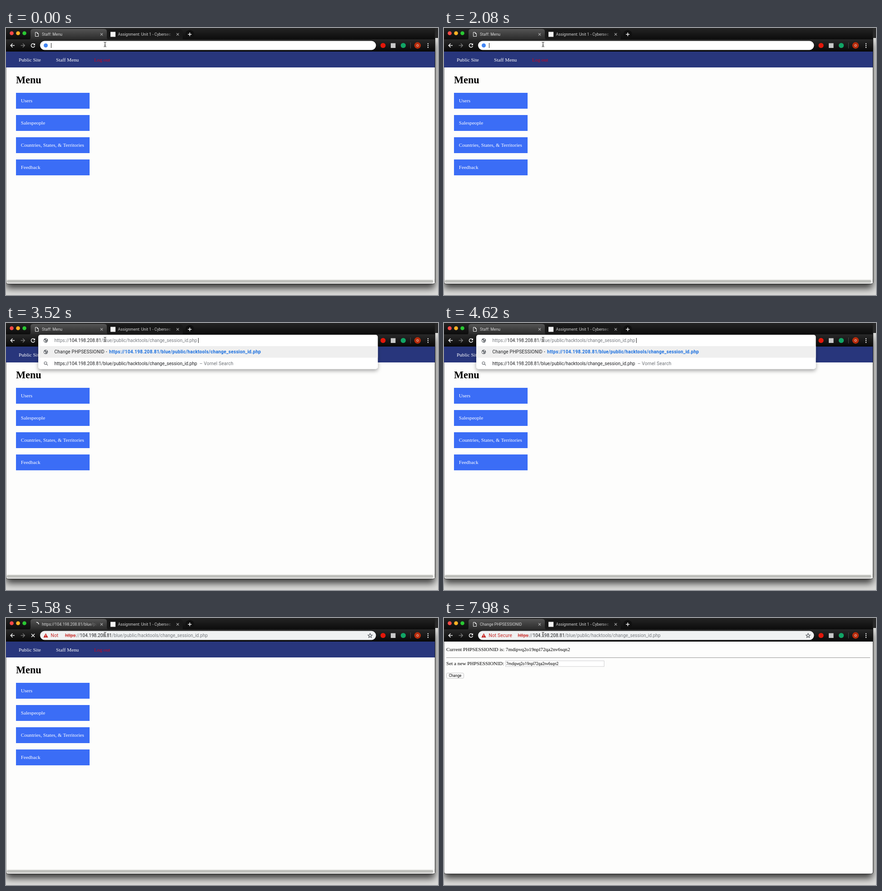
An HTML page for the animation above (8 s loop, 951x589 px).

```html
<!DOCTYPE html>
<html lang="en">
<head>
<meta charset="utf-8">
<title>Browser session</title>
<style>
  html, body { margin: 0; width: 100%; height: 100%; overflow: hidden; background: #dcdcda; }
  #shadow { position: absolute; left: 0; top: 23px; width: 944px; height: 541px; border-radius: 5px; box-shadow: 0 10px 16px rgba(0,0,0,.75); }
  svg { position: absolute; left: 0; top: 0; display: block; }
  text { font-family: Roboto, sans-serif; font-size: 10.1px; }
  .page text { font-family: "Liberation Serif", serif; font-size: 11.2px; }
  .page text.h1 { font-size: 22.3px; font-weight: bold; }
  .page text.field { font-family: Roboto, sans-serif; font-size: 8.2px; }
  .tab { font-size: 8.75px; fill: #d6d6d6; }
  .row { letter-spacing: .2px; }
  .line { fill: none; stroke: #f4f4f4; stroke-width: 1.5; }
  .thin { stroke: #b0b0b0; stroke-width: 1.1; }
</style>
</head>
<body>
<div id="shadow"></div>
<svg width="951" height="589" viewBox="0 0 951 589">
  <defs>
    <linearGradient id="strip" x2="0" y2="1"><stop stop-color="#242424"/><stop offset="1" stop-color="#0b0b0b"/></linearGradient>
    <linearGradient id="active" x2="0" y2="1"><stop stop-color="#555"/><stop offset="1" stop-color="#292929"/></linearGradient>
    <linearGradient id="bar" x2="0" y2="1"><stop stop-color="#292929"/><stop offset="1" stop-color="#080808"/></linearGradient>
    <linearGradient id="fade1" gradientUnits="userSpaceOnUse" x1="182" x2="201"><stop stop-color="#d6d6d6"/><stop offset="1" stop-color="#d6d6d6" stop-opacity="0"/></linearGradient>
    <linearGradient id="fade2" gradientUnits="userSpaceOnUse" x1="348" x2="369"><stop stop-color="#d0d0d0"/><stop offset="1" stop-color="#d0d0d0" stop-opacity="0"/></linearGradient>
    <filter id="drop" x="-5%" y="-20%" width="110%" height="160%"><feDropShadow dx="0" dy="4" stdDeviation="4" flood-opacity=".35"/></filter>
    <clipPath id="chipClip"><rect id="chipBox" x="96" y="28" width="0" height="21"/></clipPath>
    <g id="globe">
      <circle r="4.8" fill="#5f6368"/>
      <path d="M-3.8-1.5 -1-.2 -.4 2 -1 3.8 -3.4 1.6zM0-3.8 2.6-3 2.2-.8 0-1.6zM1.4 1 3.6.8 2 3.2z" fill="#fff"/>
    </g>
    <path id="cross" d="M-2.6-2.6 2.6 2.6M2.6-2.6-2.6 2.6"/>
  </defs>

  <rect x="944" width="7" height="22" fill="#292929"/>
  <path d="M0 0H944.5V560q0 4.5-5 4.5H5q-5 0-5-4.5z" fill="#fdfdfc" stroke="#262626"/>

  <g class="page" id="menuPage">
    <rect y="52" width="944" height="35" fill="#28367c"/>
    <g fill="#fff"><text x="28" y="74">Public Site</text><text x="110" y="74">Staff Menu</text></g>
    <text x="194" y="74" fill="#d0001c">Log out</text>
    <text class="h1" x="22" y="122">Menu</text>
    <g id="items"></g>
    <rect x="1" y="554" width="943" height="9" fill="#f2f2f0"/>
    <rect x="1.5" y="556" width="939" height="6" rx="3" fill="#bfc0bc"/>
  </g>

  <g class="page" id="sessionPage">
    <text x="5" y="73">Current PHPSESSIONID is: 7mdipvq2o19npl72qa2nv6sqn2</text>
    <path d="M5 87.5H938" stroke="#949494"/>
    <text x="5" y="104">Set a new PHPSESSIONID:</text>
    <rect x="135.5" y="94.5" width="217" height="12.5" fill="#fff" stroke="#cfcfd2"/>
    <text class="field" x="137" y="104">7mdipvq2o19npl72qa2nv6sqn2</text>
    <rect x="5.5" y="121.5" width="38" height="11.5" rx="2.5" fill="#fff" stroke="#c4c4c4"/>
    <text class="field" x="10.7" y="130">Change</text>
  </g>

  <rect width="944" height="26" fill="url(#strip)"/>
  <path d="M222 25V9q0-6 6-6H383q6 0 6 6V25z" fill="#191919"/>
  <path d="M49 26q5 0 5-6V8q0-6 6-6H216q6 0 6 6V20q0 6 5 6z" fill="url(#active)"/>
  <rect y="25" width="944" height="27" fill="url(#bar)"/>
  <circle cx="12.5" cy="11.5" r="4.3" fill="#fb4948"/>
  <circle cx="26.5" cy="11.5" r="4.3" fill="#fdb225"/>
  <circle cx="40.5" cy="11.5" r="4.3" fill="#2ac833"/>
  <path id="doc" class="line" style="stroke-width:1" d="M64.5 9.5H68.5L71.5 12.5V18.5H64.5zM68.5 9.5V12.5H71.5"/>
  <path id="spinner" class="line"/>
  <text id="title" class="tab" x="79" y="17" fill="url(#fade1)" style="fill:url(#fade1)"></text>
  <use href="#cross" class="thin" x="210.5" y="14"/>
  <rect x="230" y="8.5" width="11" height="11" fill="#f5f5f5"/>
  <text class="tab" x="246.5" y="17" style="fill:url(#fade2)">Assignment: Unit 1 - Cybersec</text>
  <use href="#cross" class="thin" x="378" y="14"/>
  <circle cx="404.5" cy="14" r="9.5" fill="#101010"/>
  <path class="line" d="M400.5 14H408.5M404.5 10V18"/>

  <path class="line" d="M19 38.5H10.5M14.5 34.3 10.3 38.5 14.5 42.7"/>
  <path class="line" style="stroke:#777" d="M32.5 38.5H41M37 34.3 41.2 38.5 37 42.7"/>
  <g id="reload"><path class="line" d="M62.4 35.6A4.1 4.1 0 1 0 63.4 39.8"/><path d="M64 33.8V38H59.8z" fill="#f4f4f4"/></g>
  <path id="stop" class="line" d="M56 35 63 42M63 35 56 42"/>
  <rect id="pill" x="75" y="28.5" width="739.5" height="20" rx="10"/>
  <circle cx="830" cy="38.5" r="5.6" fill="#e3170b"/>
  <rect x="847" y="33.5" width="10.5" height="10.5" fill="#c9c9c9"/>
  <circle cx="874.5" cy="38.5" r="5.6" fill="#11a566"/>
  <path d="M890.5 32V45" stroke="#4a4a4a"/>
  <circle cx="906" cy="38.5" r="7.2" fill="#b72b0b"/>
  <text x="906" y="41.4" text-anchor="middle" fill="#fff" style="font-size:8px">O</text>
  <g fill="#f4f4f4"><circle cx="929" cy="34.7" r="1.2"/><circle cx="929" cy="38.7" r="1.2"/><circle cx="929" cy="42.7" r="1.2"/></g>

  <g id="popup">
    <rect x="71" y="26" width="747.5" height="75.5" rx="5" fill="#fff" filter="url(#drop)"/>
    <rect x="71" y="51" width="747.5" height="25.5" fill="#efefef"/>
    <use href="#globe" x="87.5" y="63.8"/>
    <g class="row">
      <text x="106.5" y="67.3" fill="#202124">Change PHPSESSIONID -</text>
      <text x="227" y="67.3" fill="#1a6fdf" font-weight="700" style="letter-spacing:.26px">https://104.198.208.81/blue/public/hacktools/change_session_id.php</text>
    </g>
    <path d="M89.5 91 92 93.5" stroke="#6b6f74" stroke-width="1.3"/>
    <circle cx="87" cy="88.4" r="2.9" fill="none" stroke="#6b6f74" stroke-width="1.2"/>
    <text x="106.5" y="92.5" fill="#202124">https://104.198.208.81/blue/public/hacktools/change_session_id.php</text>
    <text class="row" x="426" y="92.5" fill="#6b6f74">– Vornel Search</text>
  </g>

  <circle id="engine" cx="87.5" cy="38.5" r="4.5" fill="#4285f4"/>
  <use id="globeIcon" href="#globe" x="87.5" y="38.5"/>
  <g id="info" fill="none" stroke="#5f6368" stroke-width="1.1"><circle cx="87.5" cy="38.5" r="4.6"/><path d="M87.5 38V41.2M87.5 35.8V37"/></g>
  <g id="warning">
    <path d="M87.5 33.7 92.6 43H82.4z" fill="#c5221f"/>
    <path d="M87.5 36.8V39.8M87.5 40.7V41.8" stroke="#fff"/>
    <text class="row" x="98.5" y="42" fill="#c5221f" clip-path="url(#chipClip)">Not Secure</text>
  </g>
  <g id="url">
    <text y="42" fill="#777b80"><tspan id="scheme">https</tspan>://<tspan fill="#202124">104.198.208.81</tspan>/blue/public/hacktools/change_session_id.php</text>
    <path id="strike" d="M0 38.8H24" stroke="#c5221f"/>
  </g>
  <path id="caret" d="M0 33V44" stroke="#222"/>
  <path id="star" fill="none" stroke="#4d5156" stroke-width="1.1"/>
  <g fill="none">
    <path id="beam" d="M215.5 31.3q2.5 0 2.5 1.3 0-1.3 2.5-1.3M218 32.5V40.5M215.5 41.5q2.5 0 2.5-1.3 0 1.3 2.5 1.3M216.8 38H219.2" stroke="#fff" stroke-opacity=".7" stroke-width="2.2"/>
    <use href="#beam" style="stroke:#111"/>
    <path d="M215.5 31.3q2.5 0 2.5 1.3 0-1.3 2.5-1.3M218 32.5V40.5M215.5 41.5q2.5 0 2.5-1.3 0 1.3 2.5 1.3M216.8 38H219.2" stroke="#111"/>
  </g>
</svg>
<script>
const LOOP = 8000, PASTE = 2560, ENTER = 4740, COMMIT = 5480, LOADED = 5700;
const $ = id => document.getElementById(id);
const set = (id, attrs) => Object.entries(attrs).forEach(([k, v]) => $(id).setAttribute(k, v));
const show = (id, on) => { $(id).style.display = on ? '' : 'none'; };
const ramp = (t, from, to) => Math.max(0, Math.min(1, (t - from) / (to - from)));

$('items').innerHTML = ['Users', 'Salespeople', 'Countries, States, &amp; Territories', 'Feedback']
  .map((label, i) => `<rect x="22" y="${143 + 49 * i}" width="162" height="35" fill="#3b6df6"/>
    <text x="32.7" y="${164 + 49 * i}" fill="#fff">${label}</text>`).join('');

const polar = (cx, cy, r, deg) => {
  const a = deg * Math.PI / 180;
  return `${(cx + r * Math.cos(a)).toFixed(2)} ${(cy + r * Math.sin(a)).toFixed(2)}`;
};
set('star', { d: 'M' + Array.from({ length: 10 }, (_, i) => polar(801.5, 39, i % 2 ? 2.2 : 5, i * 36 - 90)).join('L') + 'z' });

function drawSpinner(t) {
  let start, end;
  if (t < COMMIT) {
    end = -90 - Math.max(0, t - 4900) * .27;
    start = end - 20 - 70 * ramp(t, 4900, 5200);
  } else {
    end = (t - 5580) * .4;
    start = end - 100;
  }
  set('spinner', { d: `M${polar(67.5, 14, 4.5, start)}A4.5 4.5 0 0 1 ${polar(67.5, 14, 4.5, end)}` });
}

function render(t) {
  const typed = t >= PASTE, entered = t >= ENTER, committed = t >= COMMIT, loaded = t >= LOADED;
  const loading = entered && !loaded;
  show('menuPage', !loaded);
  show('sessionPage', loaded);
  show('reload', !loading);
  show('stop', loading);
  show('doc', !loading);
  show('spinner', loading);
  if (loading) drawSpinner(t);
  $('title').textContent = loaded ? 'Change PHPSESSIONID' : committed ? 'https://104.198.208.81/blue/pu' : 'Staff: Menu';

  set('pill', { fill: entered ? '#f0f2f3' : '#fff' });
  $('popup').style.opacity = ramp(t, PASTE, 2760) * (1 - ramp(t, ENTER, 4920));
  show('engine', !typed);
  show('globeIcon', typed && !entered);
  show('info', entered && !committed);
  show('warning', committed);
  show('star', entered);
  show('caret', !entered);
  set('caret', { transform: `translate(${typed ? 423.5 : 99.5})` });

  const urlX = entered ? 98.5 + 64 * ramp(t, COMMIT, 5686) : 106.5;
  show('url', typed);
  set('url', { transform: `translate(${urlX})` });
  set('scheme', { fill: committed ? '#c5221f' : '#777b80' });
  show('strike', committed);
  set('chipBox', { width: Math.max(0, urlX - 108) });
}

const origin = performance.now();
function tick() {
  render((performance.now() - origin) % LOOP);
  requestAnimationFrame(tick);
}
render(0);
requestAnimationFrame(tick);
</script>
</body>
</html>
```
